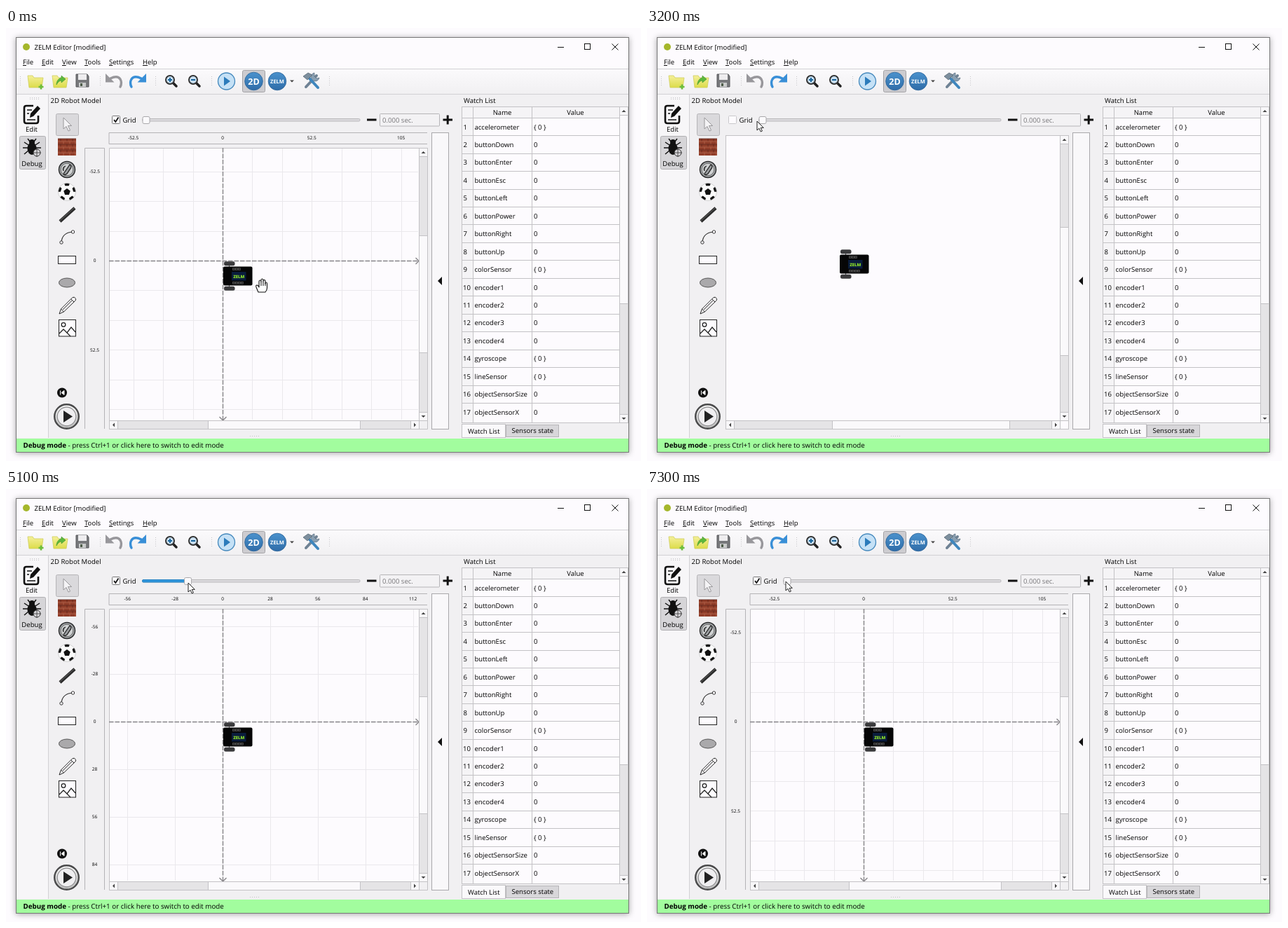
Write an HTML page that moves like this. It is 906x618 px and loops after 8300 ms.

```html
<!DOCTYPE html>
<html lang="en">
<head>
<meta charset="utf-8">
<title>Robot model grid</title>
<style>
html, body { margin: 0; width: 100%; height: 100%; overflow: hidden; background: #fdfbfe; }
svg { display: block; width: 906px; height: 618px; }
text { font-family: "Open Sans", "Noto Sans", sans-serif; font-size: 9.55px; fill: #000; text-rendering: geometricPrecision; white-space: pre; }
.mid { text-anchor: middle; }
.tick { font-size: 6.5px; text-anchor: middle; }
.status { font-size: 9.8px; }
.shadow { filter: drop-shadow(0 1px 4px rgba(0, 0, 0, .35)); }
</style>
</head>
<body>
<svg id="stage" viewBox="0 0 906 618">
  <defs>
    <linearGradient id="bar" x2="0" y2="1"><stop stop-color="#fbfafc"/><stop offset="1" stop-color="#f1f0f2"/></linearGradient>
    <linearGradient id="blue" x2="0" y2="1"><stop stop-color="#4b92cd"/><stop offset="1" stop-color="#2f6ca8"/></linearGradient>
    <linearGradient id="folder" x2="0" y2="1"><stop stop-color="#f5f09a"/><stop offset="1" stop-color="#dcdc4a"/></linearGradient>
    <linearGradient id="steel" x2="0" y2="1"><stop stop-color="#fafafa"/><stop offset="1" stop-color="#b9b9b9"/></linearGradient>
    <clipPath id="ball"><circle r="12.5"/></clipPath>
  </defs>
  <g id="frame"></g>
  <g id="view"></g>
  <g id="cursor"></g>
</svg>
<script>
const LOOP = 8300;
const BRAND = "ZELM";
const GREY = "#f1f0f2", WHITE = "#fdfbfe", LINE = "#c3c2c5", INK = "#111";
const $ = id => document.getElementById(id);

const text = (x, y, s, extra = "") => `<text x="${x}" y="${y}" ${extra}>${s}</text>`;
const rect = (x, y, x2, y2, fill, stroke = "none", r = 0) =>
  `<rect x="${x}" y="${y}" width="${x2 - x}" height="${y2 - y}" rx="${r}" fill="${fill}" stroke="${stroke}"/>`;
const path = (d, fill = "none", stroke = "none", w = 1, extra = "") =>
  `<path d="${d}" fill="${fill}" stroke="${stroke}" stroke-width="${w}" ${extra}/>`;
const circle = (x, y, r, fill, stroke = "none", w = 1) =>
  `<circle cx="${x}" cy="${y}" r="${r}" fill="${fill}" stroke="${stroke}" stroke-width="${w}"/>`;
const at = (x, y, s) => `<g transform="translate(${x} ${y})">${s}</g>`;
const round = 'stroke-linecap="round" stroke-linejoin="round"';

function arrowHead(x, y, angle, size = 3) {
  return `<path transform="translate(${x} ${y}) rotate(${angle})" d="M${-size} ${size / 2}L0 ${-size / 2}L${size} ${size / 2}Z" fill="#444"/>`;
}

function scrollbar(x, y, x2, y2, from, to) {
  const tall = y2 - y > x2 - x, cx = (x + x2) / 2, cy = (y + y2) / 2;
  let s = rect(x, y, x2, y2, "#e5e4e6", LINE);
  if (tall) {
    s += rect(x, y, x2, y + 12, "#f8f7f9", LINE) + rect(x, y2 - 12, x2, y2, "#f8f7f9", LINE)
      + rect(x, from, x2, to, "#faf9fb", LINE)
      + arrowHead(cx, y + 6, 0) + arrowHead(cx, y2 - 6, 180);
  } else {
    s += rect(x, y, x + 12, y2, "#f8f7f9", LINE) + rect(x2 - 12, y, x2, y2, "#f8f7f9", LINE)
      + rect(from, y, to, y2, "#faf9fb", LINE)
      + arrowHead(x + 6, cy, -90) + arrowHead(x2 - 6, cy, 90);
  }
  return s;
}

const dots = (x, y, dx, dy, n) => Array.from({ length: n }, (_, i) =>
  rect(x + dx * i, y + dy * i, x + dx * i + 1, y + dy * i + 1, "#c4c3c6")).join("");

function titleAndMenu() {
  const menu = [[24, "File"], [51, "Edit"], [80, "View"], [112, "Tools"], [147, "Settings"], [195, "Help"]];
  return `<g class="shadow">${rect(14.5, 13.5, 888.5, 605.5, GREY, "#777")}</g>`
    + rect(15, 14, 888, 58, WHITE) + rect(15, 58, 888, 94, "url(#bar)") + rect(15, 95, 60, 585, "#f7f6f8")
    + circle(29, 27, 5, "#a5b72c")
    + text(40.5, 30.5, BRAND + " Editor [modified]")
    + path("M787 27.5h9M864.5 22.5l9 9m0-9l-9 9", "none", INK)
    + rect(825.5, 22.5, 833.5, 30.5, "none", INK)
    + menu.map(([x, s]) => text(x, 52, `<tspan text-decoration="underline">${s[0]}</tspan>${s.slice(1)}`)).join("")
    + path("M15 58.5H888M15 94.5H888M60.5 95V585", "none", "#d2d1d4");
}

function lens(x, plus) {
  return at(x, 75, path("M3 3L8 8", "none", "#222", 3.5, round)
    + circle(-1, -1, 6, "#c9dff0", "#333", 2)
    + path(plus ? "M-4-1h6M-1-4v6" : "M-4-1h6", "none", "#17649c", 2));
}

function turnArrow(x, color, flip) {
  return `<g transform="translate(${x} 75) scale(${flip} 1)">`
    + path("M-5-3Q5-8 9-2Q12 3 9 9", "none", color, 3.4, 'stroke-linecap="round"')
    + path("M-12-10V2.500H0.500Z", color) + "</g>";
}

function toolbar() {
  const folder = path("M-11-8h7l2 3h13l-2 14h-18z", "url(#folder)", "#cfcd5c", .8);
  const badge = (x, s, size) => circle(x, 76, 12.8, "url(#blue)", "#2a6299", .8)
    + text(x, 76 + size * .36, s, `class="mid" style="font-size:${size}px;font-weight:700;fill:#fff"`);
  return [20, 134, 213, 293, 461].map(x => dots(x, 69, 0, 3, 5)).join("")
    + at(42, 76, folder + path("M4.500 8h7M8 4.500v7", "none", "#6cbd3c", 2.6))
    + at(77, 76, folder + path("M-5 5C-5-2 0-5 2-5v-3l6 5-6 5v-3C0-1-3 1-5 5Z", "#5cb83d", "#3f962a", .6))
    + at(109, 75, path("M-9-9H7l2 3V9H-9Z", "#77787b", "#56575a")
      + rect(-6, -9, 6, -1, "#eeedef") + rect(-5, 3, 5, 9, "#c8cac9") + rect(-3, 4, 0, 8, "#4d5b49"))
    + turnArrow(154, "#98979b", 1) + turnArrow(188, "#398fd7", -1)
    + lens(235, true) + lens(268, false)
    + circle(314.5, 76, 12, "#c5e1f6", "#4589bd", 1.3) + path("M311 69.500L320 76L311 82.500Z", "#2b7bbb")
    + rect(337.5, 60.5, 369.5, 91.5, "#cdccd0", "#a3a2a5", 2)
    + badge(353.5, "2D", 12.5) + badge(387, BRAND, 7.5)
    + arrowHead(408, 76, 180)
    + at(436, 75, path("M-8 9L7-7", "none", "#6f8294", 4, round)
      + path("M4-11a6 6 0 1 0 7 7l-4 1-3-3z", "#8ba0b2", "#5a6d7e", .7)
      + path("M-4-4L9 10", "none", "#3f86bd", 4, round)
      + path("M-12-6L-5-11L1-8L-6-1Z", "#7c8e9d", "#52616e", .7));
}

function modes() {
  const legs = "M-5-3l-6-4M-6 1h-7M-5 5l-6 5M5-3l6-4M6 1h7M-3-8l-3-4M3-8l3-4";
  return dots(34, 99, 3, 0, 5) + dots(34, 101, 3, 0, 5)
    + at(37, 123, path("M2-12H-8Q-11-12-11-9V10Q-11 13-8 13H6Q9 13 9 10V2", "none", INK, 2.6)
      + path("M-3 5L-2-1L8-12L12-8L2 3Z", INK) + path("M-7-6H0M-7-1H-4M-7 8H5", "none", INK, 1.6))
    + text(36.5, 148, "Edit", 'class="mid"')
    + rect(19.500, 154.5, 56.5, 201.5, "#d6d5d8", "#b0afb2", 2)
    + at(37, 170, path(legs, "none", INK, 1.5) + `<ellipse cy="2" rx="6.500" ry="9" fill="${INK}"/>` + circle(0, -7, 4, INK)
      + circle(7, 8, 5, "#d6d5d8", "#333") + path("M1 8H13M7 2V14", "none", "#333", .8))
    + text(37, 197, "Debug", 'class="mid"');
}

function soccerBall() {
  const corners = [0, 1, 2, 3, 4].map(i => [Math.sin(i * Math.PI * .4), -Math.cos(i * Math.PI * .4)]);
  const spot = (x, y, r) => path("M" + corners.map(([a, b]) => `${x + a * r} ${y + b * r}`).join("L") + "Z", INK);
  return circle(0, 0, 12.5, "#fafafa")
    + `<g clip-path="url(#ball)">${spot(0, 0, 5) + corners.map(([a, b]) => spot(a * 12.5, b * 12.5, 4.6)).join("")}</g>`
    + circle(0, 0, 12.5, "none", "#bbb", .6);
}

function palette() {
  let bricks = rect(-13, -12, 13, 12, "#8f3d29");
  for (let r = 0; r < 6; r++)
    bricks += path(`M-13 ${-12 + r * 4}h26M${-9 + r % 2 * 4} ${-12 + r * 4}v4m9 0v-4m8 0v4`, "none", r % 2 ? "#b7674e" : "#5f281c", .8);
  return text(63.5, 106.5, "2D Robot Model")
    + rect(71.500, 122.500, 103.500, 153.500, "#dad9dc", "#b5b4b7", 2)
    + at(82, 128, path("M0 0V16L4 12.500L7 19L9.500 18L6.500 11.500H11.500Z", "#f4f3f5", "#98979a"))
    + at(87, 170, bricks)
    + at(87, 202, circle(0, 0, 11.5, "#a3a6a8", "#2c2d2e", 1.5) + circle(0, 0, 8.8, "#cfd1d2", "#555", .8)
      + path("M-5 6L4-7Q8-5 4 0L0 6Q-4 9-5 6M-2-5Q-7-3-5 2", "#9a9da0", "#222", 1.3))
    + at(87, 234, soccerBall())
    + path("M77 276L98 257", "none", "#2b2b2b", 4.5) + path("M77 275L97 257", "none", "#777", .8)
    + path("M79 306Q80 292 95 291", "none", "#333", 1.2)
    + circle(79, 306, 2.2, WHITE, "#333") + circle(95.500, 291, 2.2, WHITE, "#333")
    + rect(74.500, 325.500, 99.5, 336.5, WHITE, "#222")
    + `<ellipse cx="87" cy="363.500" rx="11.500" ry="6.500" fill="#aaa9ab" stroke="#555"/>`
    + path("M76 408L78.500 401L95 384.500Q98 383 99.500 386.500Q100 388 98.500 389.500L82.500 405Z M78.500 401L82.500 405M93 387L97 391M81 402L95 388", WHITE, "#222")
    + rect(75.500, 416.500, 99.500, 440, WHITE, "#222") + circle(82, 423.500, 2.8, "none", "#222", 1.3)
    + path("M76 436L82 430L87 435L93 427L99 434M86 434L92 440", "none", "#222", 1.3)
    + circle(80, 520.500, 7, INK) + path("M77.500 517.500v6M83 517.500L79 520.500L83 523.500Z", "#fff", "#fff")
    + circle(86.500, 554.500, 17.3, "url(#steel)", "#4a4a4b", 2.4) + circle(86.500, 554.500, 13.300, "#efeef0", "#8e8e90", 1.2)
    + path("M82 546L95 554.500L82 563Z", "#222");
}

function watchList() {
  const names = ["accelerometer", ..."Down Enter Esc Left Power Right Up".split(" ").map(s => "button" + s), "colorSensor",
    "encoder1", "encoder2", "encoder3", "encoder4", "gyroscope", "lineSensor", "objectSensorSize", "objectSensorX"];
  const braces = ["accelerometer", "colorSensor", "gyroscope", "lineSensor"];
  let s = text(653, 106.500, "Watch List") + rect(650.500, 112.500, 875.500, 563.500, WHITE, LINE)
    + rect(651, 113, 875, 128, "#f5f4f6") + rect(651, 128, 666, 563, "#f5f4f6")
    + text(708, 123.500, "Name", 'class="mid"') + text(812.500, 123.500, "Value", 'class="mid"')
    + path("M650 128.500H875M666.500 112V563M750.500 112V563", "none", LINE);
  names.forEach((name, i) => {
    const y = 141 + i * 25.45;
    s += text(i < 9 ? 652.500 : 652, y + 3.500, i + 1) + text(668.500, y + 3.500, name)
      + text(753, y + 3.500, braces.includes(name) ? "{ 0 }" : "0");
    if (i < 16) s += path(`M650 ${Math.floor(y + 12.700) + .5}H875`, "none", LINE);
  });
  return s + scrollbar(875.500, 112.500, 887.500, 563.500, 124.500, 393.500)
    + rect(713.500, 566.500, 788.500, 583.500, "#d8d7da", "#b5b4b7") + text(721.500, 578, "Sensors state")
    + rect(650.500, 565.500, 712.500, 584.500, "#faf9fb", LINE) + text(659, 578.500, "Watch List");
}

function panelEdges() {
  return rect(607.500, 149.500, 631.500, 572.500, "#f9f8fa", "#a9a8ab") + path("M622 355L616 361L622 367Z", INK)
    + path("M515 131H528.500M623.500 131H637M630.200 124.500V137.500", "none", INK, 3)
    + rect(533.500, 122.500, 618.500, 140, "#f3f2f4", "#b5b4b7", 1) + text(537, 135, "0.000 sec.", 'style="fill:#777679"')
    + dots(348, 582, 3, 0, 5)
    + rect(15, 586, 888, 605, "#a2fd9e")
    + text(24.500, 599, '<tspan font-weight="700">Debug mode</tspan> - press Ctrl+1 or click here to switch to edit mode', 'class="status"');
}

// Robot, relative to the axis crossing.
function robot(x, y) {
  const pins = (px, py, n) => Array.from({ length: n }, (_, i) => rect(px + i * 4, py, px + i * 4 + 2.800, py + 2.600, "#1c1c1c", "#4c4c4c")).join("");
  return at(x, y, path("M9 4V40", "none", "#555", 1.2)
    + rect(1.500, .7, 17, 6.700, "#3b3b3d", "none", 2.5) + rect(1.500, 36.200, 17, 42.200, "#3b3b3d", "none", 2.5)
    + rect(.5, 8, 42, 35, "#060607", "none", 2)
    + pins(14, 10.300, 3) + pins(14, 30, 4)
    + rect(12.500, 15.500, 33, 28, "#0a1c3c")
    + text(22.800, 24, BRAND, 'class="mid" style="font-size:6px;font-weight:800;fill:#8ee229"'));
}

const ORIGIN = { x: 309.5, y: 332.5 }, SCALE = 2.425;

function gridView(n) {
  const cell = 17.5 + .35 * n;
  const every = Math.max(1, Math.floor(53 / cell));
  let lines = "", labels = "";
  for (let k = -12; k <= 12; k++) {
    const x = ORIGIN.x + k * cell * SCALE, y = ORIGIN.y + k * cell * SCALE;
    const label = Number((k * cell).toFixed(2));
    const inX = x > 148 && x < 588, inY = y > 172 && y < 561;
    if (inX) lines += `M${Math.floor(x) + .5} 171V559`;
    if (inY && y < 559) lines += `M147 ${Math.floor(y) + .5}H588`;
    if (k % every) continue;
    if (inX) labels += text(x - .5, 159.300, label, 'class="tick"');
    if (inY) labels += text(126.500, y + 1.800, label, 'class="tick"');
  }
  return rect(147, 171, 589, 560, WHITE)
    + path(lines, "none", "#eae8ec")
    + path("M147 165.500V149.500H601M147 165.500H601M112.500 572V171.500H140.500V572", "none", "#b4b3b6")
    + labels + path("M147.500 171.500H601.500V572.500H147.500Z", "none", LINE)
    + path("M309.500 171V559M147 332.500H588", "none", "#858487", 1.4, 'stroke-dasharray="6.500 2"')
    + path("M304.500 555L309.500 560L314.500 555M584.500 328L589 332.500L584.500 337", "none", "#858487", 1.3)
    + robot(ORIGIN.x, ORIGIN.y)
    + scrollbar(589.500, 171.500, 601.500, 560.500, 296.500, 463.500)
    + scrollbar(147.500, 560.500, 589.500, 572.500, 288.500, 505.500);
}

function plainView() {
  return rect(112.500, 153.500, 601.500, 572.500, WHITE, LINE)
    + robot(ORIGIN.x - 35, ORIGIN.y - 17)
    + scrollbar(589.500, 153.500, 601.500, 560.500, 284.500, 467.500)
    + scrollbar(112.500, 560.500, 589.500, 572.500, 264.500, 517.500);
}

function gridControls(on, n) {
  const left = on ? 0 : -35, knob = 200 + left + 1.985 * n;
  return rect(151.500 + left, 125.500, 162.500 + left, 136.500, WHITE, on ? "#777" : "#c9c8cb", 1)
    + (on ? path("M154 131L156.300 134L160.500 127.500", "none", INK, 1.8) : "")
    + text(166.500 + left, 135, "Grid")
    + rect(194.500 + left, 129.500, 505, 133, "#dcdbde", "#b8b7ba", 1.5)
    + (n ? rect(194.500, 129.500, knob, 133, "#3096dc", "#2583c4", 1.5) : "")
    + rect(knob - 5, 126.500, knob + 5, 136.500, "#fbfafc", "#a9a8ab", 2);
}

const ARROW = path("M0 0V13L3 10.200L5.300 15L7.400 14L5.200 9.400H9.300Z", "#fff", "#222");
const HAND = path("M-4 9L-7 2Q-8-1-6-1Q-4-1-3 2V-6Q-3-8-1.500-8Q0-8 0-6V-8Q0-10 1.500-10Q3-10 3-8V-6Q3-8.500 4.500-8.500Q6-8.500 6-6V-3Q6-5 7.200-5Q8.500-5 8.500-3V3Q8.500 6 6 9Z", "#fff", INK, 1.1, 'stroke-linejoin="round"')
  + path("M0-6V0M3-6V0M6-4V0", "none", INK);

// time, pointer x, pointer y, slider value
const steps = [
  [0, 364, 368], [2000, 327, 282], [2100, 276, 226], [2200, 229, 185], [2300, 192, 157], [2400, 167, 140], [2500, 157, 133],
  [3200, 157, 133], [3300, 143, 132], [3400, 129, 131], [3500, 121, 131],
  [4200, 121, 131], [4300, 140, 132], [4400, 168, 133], [4500, 191, 134], [4600, 200, 134]
];
const drag = (start, values) => values.forEach((n, i) => steps.push([start + i * 100, 200 + 2 * n, 134, n]));
drag(4700, [3, 9, 16, 23, 30, 38, 46, 53, 59, 63]);
drag(6600, [57, 49, 39, 30, 21, 12, 4]);
steps.push([7300, 198, 132]);

let shown = -1;
function tick() {
  const time = performance.now() % LOOP;
  const index = steps.findLastIndex(s => s[0] <= time);
  if (index !== shown) {
    shown = index;
    const [start, x, y, n = 0] = steps[index];
    const on = start < 3200 || start >= 4200;
    $("view").innerHTML = gridControls(on, n) + (on ? gridView(n) : plainView());
    $("cursor").innerHTML = at(x, y, y > 171 ? HAND : ARROW);
  }
  requestAnimationFrame(tick);
}

$("frame").innerHTML = titleAndMenu() + toolbar() + modes() + palette() + watchList() + panelEdges();
tick();
</script>
</body>
</html>
```
